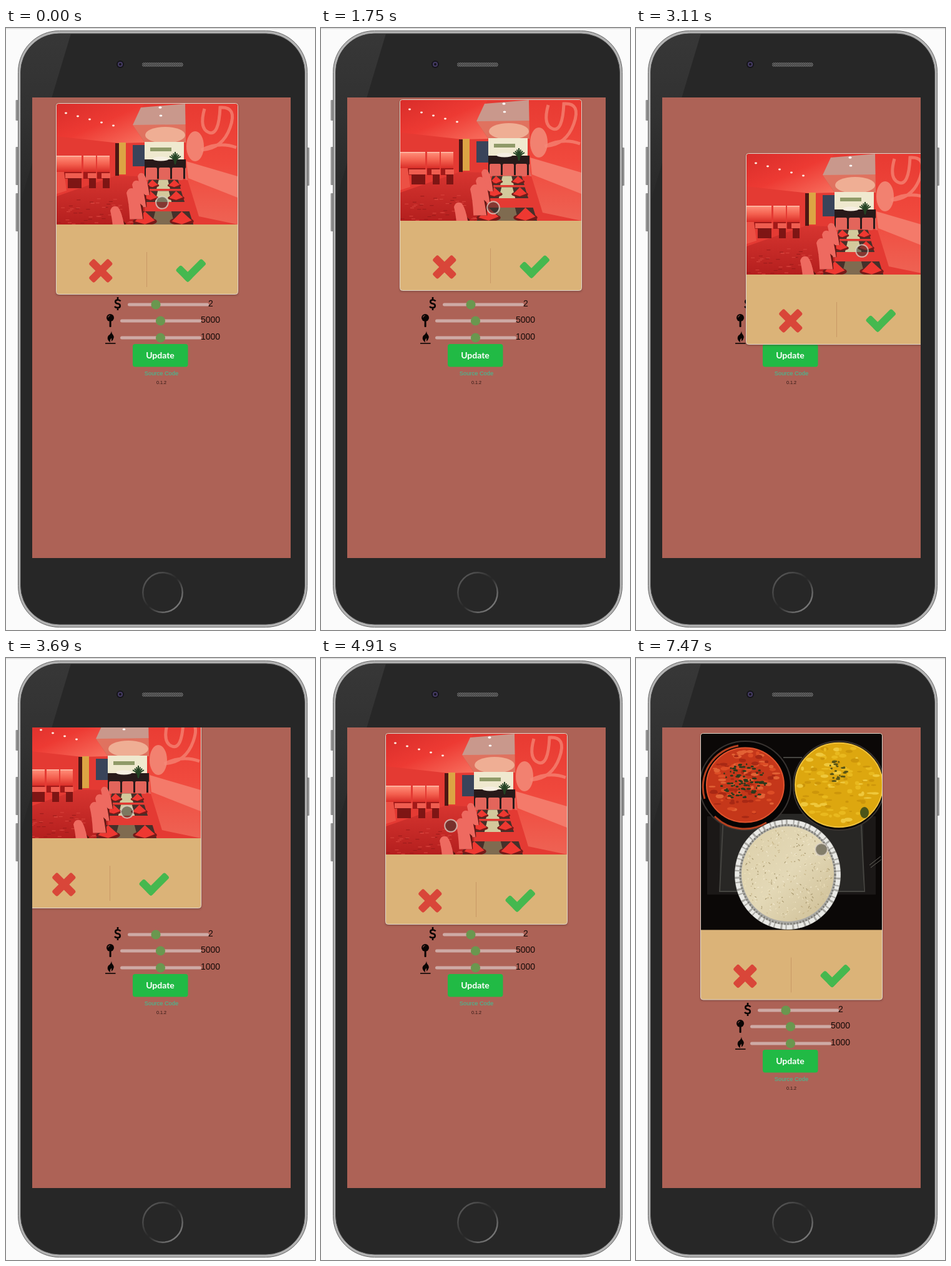
An HTML page for the animation above (8 s loop, 495 by 962 pixels).

```html
<!DOCTYPE html>
<html lang="en">
<head>
<meta charset="utf-8">
<title>Swipe cards</title>
<style>
  html, body { margin: 0; width: 100%; height: 100%; overflow: hidden; background: #fbfbfb; }
  svg { display: block; width: 100vw; height: 100vh; }
  text { font-family: Arial, "Liberation Sans", sans-serif; }
</style>
</head>
<body>
<svg id="stage" viewBox="0 0 495 962"></svg>
<script>
const stage = document.getElementById('stage');

let seed = 7;
const rnd = () => (seed = (seed * 16807) % 2147483647) / 2147483647;
const loop = (n, draw) => Array.from({ length: n }, (_, i) => draw(i)).join('');
const poly = (fill, pts) => `<polygon fill="${fill}" points="${pts}"/>`;
const box = (fill, x, y, w, h, rx = 0) =>
  `<rect fill="${fill}" x="${x}" y="${y}" width="${w}" height="${h}" rx="${rx}"/>`;
const oval = (fill, x, y, rx, ry = rx, more = '') =>
  `<ellipse fill="${fill}" cx="${x}" cy="${y}" rx="${rx}" ry="${ry}" ${more}/>`;
const line = (color, w, d, more = '') =>
  `<path fill="none" stroke="${color}" stroke-width="${w}" d="${d}" ${more}/>`;
const group = (transform, inner) => `<g transform="${transform}">${inner}</g>`;
const grad = (id, dir, ...colors) => `<linearGradient id="${id}" ${dir}>` +
  loop(colors.length, i => `<stop offset="${i / (colors.length - 1)}" stop-color="${colors[i]}"/>`) + '</linearGradient>';
const down = 'x1="0" y1="0" x2="0" y2="1"';
const slant = 'x1="0" y1="0" x2="1" y2="1"';

const defs = `<defs>
  ${grad('gloss', down, '#373737', '#313131', '#292929')}
  ${grad('home', slant, '#626262', '#484848', '#282828', '#666', '#8b8b8b')}
  ${grad('roof', slant, '#d92d2a', '#ed3a33', '#f8705f')}
  ${grad('wall', down, '#e83a32', '#f0493d', '#ee6354')}
  ${grad('seat', down, '#ff8d78', '#f4604f', '#d92e28')}
  ${grad('floor', down, '#d73530', '#b41f1e')}
  ${grad('rice', slant, '#ddd0aa', '#e3d8b6', '#cdbd94')}
  <pattern id="mesh" width="3" height="3" patternUnits="userSpaceOnUse">
    <rect width="3" height="3" fill="#3a3a3a"/><path d="M0 0L3 3M3 0L0 3" stroke="#777" stroke-width=".7"/>
  </pattern>
  <filter id="soft" x="-10%" y="-10%" width="120%" height="120%"><feGaussianBlur stdDeviation="1.5"/></filter>
  <filter id="photo"><feGaussianBlur stdDeviation=".6"/></filter>
  <clipPath id="screen"><rect x="42" y="111" width="414" height="736"/></clipPath>
  <clipPath id="body"><rect x="24" y="9" width="454" height="944" rx="61"/></clipPath>
</defs>`;

function phone() {
  const key = (x, y, h) => box('#929292', x, y, 4, h, 1);
  return box('#dcdcdc', 0, 0, 495, 1.6)
    + key(15.5, 115, 33) + key(15.5, 190, 61) + key(15.5, 264, 61) + key(482, 191, 61)
    + '<rect x="19.5" y="4.5" width="463" height="953" rx="66" fill="#b2b2b2" stroke="#666"/>'
    + '<rect x="23.5" y="9" width="455" height="944" rx="62" fill="#272727" stroke="#454545"/>'
    + `<g clip-path="url(#body)">${poly('url(#gloss)', '24,9 104,9 24,275')}</g>`
    + oval('#15141a', 183, 58, 6) + oval('#453b63', 183, 58, 4) + oval('#15141a', 183, 58, 2)
    + box('url(#mesh)', 218, 55, 66, 7, 3.5)
    + oval('none', 251, 902, 31.7, 31.7, 'stroke="url(#home)" stroke-width="2.4"')
    + box('#ad6256', 42, 111, 414, 736);
}

// Two rows of place settings, growing towards the viewer.
function tables() {
  return loop(3, i => {
    const y = 126 + 11 * i + 8 * i * i, r = 9 + .5 * i + 1.5 * i * i, gap = 17.5 + 3 * i * i;
    const slab = (fill, top, base) => poly(fill,
      `${171 - top * r},${y - r * .5} ${171 + top * r},${y - r * .5} ${171 + base * r},${y + r * 1.1} ${171 - base * r},${y + r * 1.1}`);
    const napkin = x => oval('#761b19', x, y + r * .5, r * 1.2, r * .4)
      + poly('#ee3831', `${x - r},${y + r * .5} ${x},${y - r * .5} ${x + r},${y + r * .4} ${x},${y + r * .8}`);
    return slab('#46302a', 2.6, 3.1) + slab(i < 2 ? '#d3c99c' : '#7f6b50', .8, 1.2) + napkin(171 - gap) + napkin(171 + gap);
  });
}

function diner() {
  const chair = (x, y, k) => group(`translate(${x} ${y}) scale(${k})`,
    poly('#631815', '5,10 25,28 26,48 8,48') + '<path fill="#ee6a60" d="M0 8Q3-2 12 2Q20 10 25 48H5Q4 24 0 8"/>');
  const booth = (x, w) => box('url(#seat)', x, 84, w, 25) + box('#ffc1ac', x, 83, w, 1.5) + box('#a21a19', x, 109, w, 11)
    + box('#ef5d50', x + w * .35, 111, w * .7, 8) + box('#7e1514', x + w * .45, 119, w * .55, 16);
  return `<g filter="url(#photo)">`
    + box('#e43a33', 0, 0, 290, 193)
    + poly('url(#roof)', '0,0 140,0 122,34 141,62 100,63 0,52')
    + poly('#c9988c', '135,6 208,0 208,34 122,34')
    + poly('#e0725f', '122,34 209,33 209,62 141,62') + oval('#efae94', 174, 50, 32, 13)
    // back wall and bar
    + box('#39445a', 122, 66, 19, 34) + box('#4e1714', 94, 63, 6, 54) + box('#dca444', 100, 62, 11, 51)
    + box('#efe9cf', 141, 61, 63, 29) + box('#8f9a68', 150, 70, 34, 6) + box('#281a1a', 141, 89, 66, 31)
    + oval('#f6efe2', 167, 88, 13, 3.5)
    + loop(4, i => box('#e3655b', 143 + i * 21, 102, 18, 20, 2))
    // right wall with its relief
    + poly('url(#wall)', '206,0 290,0 290,193 228,180 208,115')
    + oval('#f28170', 222, 68, 14, 24) + poly('#f47a6a', '208,92 290,116 290,150 211,119')
    + line('#f78a79', 5, 'M237 8Q228 40 244 46T262 6Q290 4 278 38T232 74Q260 60 288 70', 'opacity=".7"')
    // floor and booths
    + poly('url(#floor)', '0,148 95,115 140,116 142,193 0,193')
    + loop(60, () => box(rnd() > .5 ? '#d9443d' : '#991b1a', 130 * rnd(), 150 + 43 * rnd(), 6, 1))
    + booth(0, 40) + booth(43, 20) + booth(65, 20)
    + poly('#ec5044', '0,109 12,109 16,139 0,144')
    + tables()
    + loop(3, i => chair(130 - 9 * i, 110 + 12 * i, .75 + .15 * i)) + chair(86, 163, 1)
    + loop(7, i => line('#244324', 2, `M190 97Q190 88 ${181 + i * 3} ${77 + Math.abs(i - 3) * 2.4}`))
    + loop(5, i => oval('#fff1e4', 15 + i * 19, 15 + i * 5, 2, 1.4))
    + oval('#fff', 166, 6, 2.6, 1.8) + oval('#fff', 167, 19, 2.4, 1.6) + '</g>';
}

function scatter(n, x, y, rx, ry, draw) {
  return loop(n, i => {
    const a = rnd() * Math.PI * 2, r = Math.sqrt(rnd());
    return draw(x + Math.cos(a) * r * rx, y + Math.sin(a) * r * ry, i);
  });
}

function curry() {
  const bowl = (x, r, fill, rim, spots) => oval('#050404', x, 83, 73, 71, 'stroke="#383330" stroke-width="2"')
    + oval(fill, x, 82, r, r * .96, `stroke="${rim}" stroke-width="2"`)
    + scatter(110, x, 82, r - 5, r - 7, (px, py, i) => oval(spots[i % 3], px, py, 2 + rnd() * 5, 1 + rnd() * 2.5));
  const herbs = (n, x, y, rx, ry, fill) => scatter(n, x, y, rx, ry, (px, py) => oval(fill, px, py, 1 + rnd() * 3, 1.5));
  return box('#0b0807', 0, 0, 290, 315)
    + box('#1b1817', 10, 132, 270, 125) + box('#282725', 30, 128, 230, 124)
    + line('#454440', 2, 'M36 130L30 252H262L256 130M132 38H162')
    + line('#66645d', 1, 'M270 210L288 196M272 214L289 201')
    + bowl(71, 62, '#c5371a', '#e0532d', ['#a82814', '#dc4c25', '#e26235'])
    + line('#b54120', 3, 'M6 104A68 67 0 0 1 60 19M22 132A66 65 0 0 0 105 142')
    + herbs(80, 69, 77, 37, 29, '#29391c')
    + bowl(221, 70, '#dda70f', '#f0c13a', ['#cd960a', '#e9b91e', '#efc83c'])
    + herbs(24, 216, 60, 17, 16, '#595415')
    + oval('#4c5418', 262, 126, 7, 9)
    // foil dish
    + oval('#aaa9a4', 139, 225, 85, 88)
    + oval('none', 139, 225, 81, 84, 'stroke="#e9e9e5" stroke-width="7" stroke-dasharray="5 3 9 2"')
    + oval('none', 139, 225, 76, 79, 'stroke="#777670" stroke-width="3" stroke-dasharray="2 3"')
    + oval('url(#rice)', 139, 224, 74, 76)
    + scatter(330, 139, 224, 71, 73, (x, y, i) =>
      line(['#f3ead0', '#c3b184', '#eee2bd', '#a4946b'][i % 4], 1.1, `M${x} ${y}l${rnd() * 6 - 3} ${rnd() * 6 - 3}`));
}

const cross = loop(2, i => group(`translate(71.8 268) rotate(${45 + 90 * i})`, box('#d94639', -22, -6, 44, 12, 3.2)));
const check = group('translate(216.8 267) rotate(45)',
  box('#45b84f', -2, -24.5, 12, 42.5, 3.2) + box('#45b84f', -18, 6, 28, 12, 3.2));

function card(id, imgH, picture) {
  const h = imgH + 113;
  return `<g id="${id}">
    <clipPath id="${id}Clip"><rect x="1" y="1" width="290" height="${h - 2}" rx="3.5"/></clipPath>
    <rect y="1.5" width="292" height="${h}" rx="4" fill="#4b2a25" opacity=".4" filter="url(#soft)"/>
    <rect x=".5" y=".5" width="291" height="${h - 1}" rx="4" fill="#dbb378" stroke="#dfd6cb"/>
    <g clip-path="url(#${id}Clip)"><svg x="1" y="1" width="290" height="${imgH}">${picture}</svg></g>
    ${group(`translate(0 ${h - 306})`, line('#c99866', 1, 'M145.5 238V294') + cross + check)}</g>`;
}

function controls() {
  const ink = '#0b0504';
  const slider = (x, y, thumb, value) => box('#ceaaa5', x, y - 2.5, 130, 5, 2.5)
    + oval('#6a974f', thumb, y, 7.6) + `<text x="${x + 129}" y="${y + 3}" font-size="14" fill="#160b09">${value}</text>`;
  const dollar = line(ink, 2.6, 'M183.5 436.5Q182 434.5 179 434.5C174 434.5 174 440 179 440.5S184 447 179 447Q175.500 447 174 445M179 430V434M179 447V451');
  const pin = oval(ink, 167, 463, 6) + box(ink, 165.6, 468, 3, 10, 1)
    + line('#ad6256', 1, 'M163.5 462.500Q163.800 459.800 166.5 459.500');
  const fire = `<path fill="${ink}" d="M169 484.5Q168 489 164 491.5Q160 497 167 502.5Q166 498 169 495.5V501Q175 495 171.5 490.5Q169 488 169 484.5"/>`
    + line(ink, 1.6, 'M159 504H175.5');
  return '<g id="controls">' + dollar + pin + fire
    + slider(195, 442, 240, '2') + slider(183, 468, 247.5, '5000') + slider(183, 495, 247.5, '1000')
    + box('#21ba45', 203, 505, 88.5, 36.5, 4)
    + '<g text-anchor="middle"><text x="247" y="528" font-size="14" font-weight="700" fill="#fff" style="font-family:Lato,sans-serif">Update</text>'
    + '<text x="249" y="555" font-size="9.3" fill="#35c89b">Source Code</text>'
    + '<text x="249" y="569" font-size="7.2" fill="#2b1512">0.1.2</text></g></g>';
}

stage.innerHTML = defs + phone()
  + `<g clip-path="url(#screen)">${controls()}${card('first', 193, diner())}${card('second', 313.5, curry())}</g>`
  + '<circle id="touch" r="9.8" fill="#35342f" fill-opacity=".55" stroke="#dcd3c8" stroke-opacity=".75" stroke-width="2"/>';

const [panel, first, second, touch] = ['controls', 'first', 'second', 'touch'].map(id => document.getElementById(id));
const move = (el, x, y) => el.setAttribute('transform', `translate(${Math.round(x)} ${Math.round(y)})`);

// The view refreshes once per STEP ms; key points are [step, x, y].
const STEP = 140, SWAP = 49;
const drag = [
  [0, 80, 120], [3, 172, 136], [5, 159, 116], [10, 52, 144], [12, 126, 114], [15, 45, 95], [18, 74, 81],
  [22, 176, 200], [26, 21, 94], [31, 28, 183], [35, 103, 120], [38, 103, 120], [45, 71, 120], [SWAP, -300, 115]
];
// Touch position relative to the dragged card.
const grip = [
  [0, 170, 159], [5, 148, 160], [12, 150, 173], [18, 198, 159], [26, 173, 152],
  [35, 105, 148], [45, 105, 150], [SWAP, 390, 160], [53, 597, 191]
];

function along(keys, n) {
  const i = keys.findIndex(k => k[0] > n);
  if (i < 0) return keys[keys.length - 1].slice(1);
  const [from, ...a] = keys[i - 1], [to, ...b] = keys[i];
  const k = (1 - Math.cos(Math.PI * (n - from) / (to - from))) / 2;
  return a.map((v, j) => v + (b[j] - v) * k);
}

function render(t) {
  const n = Math.floor(t / STEP), swapped = n >= SWAP;
  const [x, y] = along(drag, n), [gx, gy] = along(grip, n);
  move(first, x, y);
  move(second, 103, 120);
  move(touch, x + gx, y + gy);
  move(panel, 0, swapped ? 121 : 0);
  first.style.display = swapped ? 'none' : '';
  second.style.display = swapped ? '' : 'none';
}

const start = performance.now();
function tick(now) {
  render(Math.max(0, now - start) % 8000);
  requestAnimationFrame(tick);
}
render(0);
requestAnimationFrame(tick);
</script>
</body>
</html>
```
